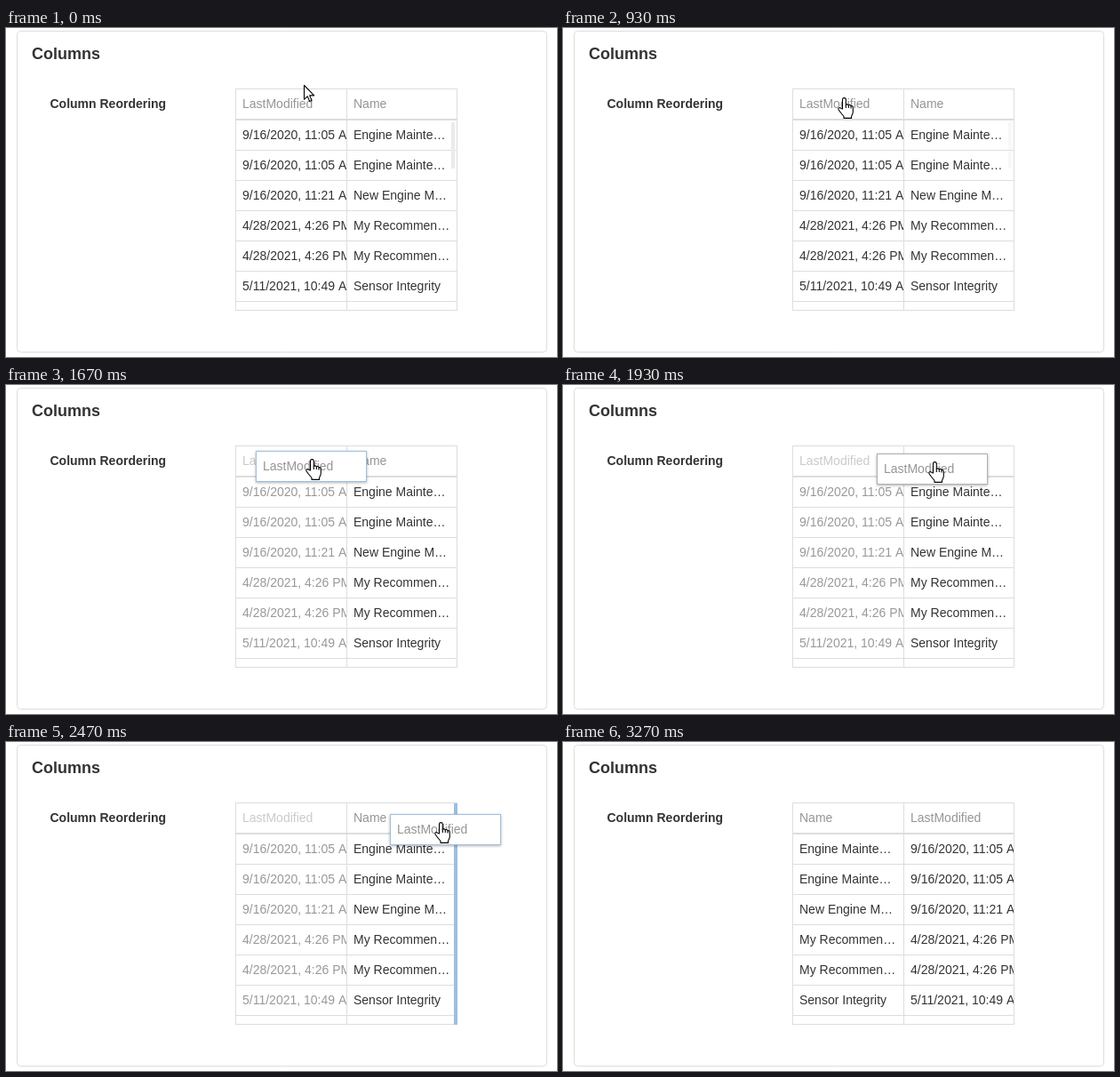
Animation of 620x370 px, one loop 4990 ms. Source, as an HTML page with a canvas:

```html
<!DOCTYPE html>
<html lang="en">
<head>
<meta charset="utf-8">
<title>Column Reordering</title>
<style>
html, body { margin: 0; width: 100%; height: 100%; overflow: hidden; background: #fff; }
canvas { display: block; }
</style>
</head>
<body>
<canvas id="stage" width="620" height="370"></canvas>
<script>
const ctx = document.getElementById("stage").getContext("2d");
const LOOP = 4990, LEFT = 258, MID = 383, RIGHT = 508, TOP = 68, BOTTOM = 318, ROW = 34;
const LINE = "#ddd", TEXT = "#333", MUTED = "#959595", BLUE = "#9cc0e0";
const DRAG = 22, DROP = 43, GONE = 49;

const modified = ["LastModified", "9/16/2020, 11:05 AM", "9/16/2020, 11:05 AM", "9/16/2020, 11:21 AM",
  "4/28/2021, 4:26 PM", "4/28/2021, 4:26 PM", "5/11/2021, 10:49 AM"];
const names = ["Name", "Engine Mainte…", "Engine Mainte…", "New Engine M…",
  "My Recommen…", "My Recommen…", "Sensor Integrity"];

// [tick, x, y]
const pointerKeys = [[3, 335, 64], [5, 328, 64], [6, 328, 64], [14, 316, 78], [19, 316, 78], [20, 316, 79],
  [21, 316, 79], [22, 324, 80], [25, 344, 83], [29, 418, 86], [33, 482, 90], [35, 488, 90],
  [37, 489, 90], [45, 489, 90], [46, 505, 90], [48, 589, 90]];
const chipKeys = [[22, 267, 73], [25, 281, 74], [29, 353, 77], [33, 416, 81], [35, 429, 81], [37, 432, 81]];

const arrow = new Path2D("M.5.5V16.3L4.2 12.8 6.6 18.4 9 17.4 6.6 11.9H11.7Z");
const hand = new Path2D("M5.5 13V2.5a1.9 1.9 0 0 1 3.8 0V8.5c.5-1 2.7-.9 3 .6 .6-1 2.4-.7 2.7.7 " +
  ".8-.7 2.3-.2 2.3 1.4V16.5c0 2-1.5 3.5-1.8 5V23.4H7V21.5C5.5 19.5 3 17 1 13.8c-.9-1.7 1.2-2.9 2.6-1.6z");
const knuckles = new Path2D("M9.3 8.5V12M12.3 9.2V12M15 10V12.5");

function along(keys, k) {
  const i = keys.findIndex(p => p[0] >= k);
  if (i < 0) return keys[keys.length - 1].slice(1);
  if (i === 0) return keys[0].slice(1);
  const a = keys[i - 1], b = keys[i], u = (k - a[0]) / (b[0] - a[0]);
  return [1, 2].map(j => Math.round(a[j] + (b[j] - a[j]) * u));
}

function rect(x, y, w, h, color) {
  ctx.fillStyle = color;
  ctx.fillRect(x, y, w, h);
}

function frame(x, y, w, h, color) {
  ctx.strokeStyle = color;
  ctx.lineWidth = 1;
  ctx.strokeRect(x + .5, y + .5, w - 1, h - 1);
}

function text(str, x, y, color, font = "14px") {
  ctx.font = font + " 'Liberation Sans', Arial, sans-serif";
  ctx.fillStyle = color;
  ctx.fillText(str, x, y);
}

function column(cells, x, alpha) {
  ctx.save();
  ctx.beginPath();
  ctx.rect(x, TOP, 125, BOTTOM - TOP);
  ctx.clip();
  ctx.globalAlpha = alpha;
  cells.forEach((c, i) => text(c, x + 8, i ? 91 + i * ROW : 90, i ? TEXT : MUTED));
  ctx.restore();
}

function chip(x, y, color) {
  ctx.save();
  ctx.shadowColor = "rgba(0,0,0,.3)";
  ctx.shadowBlur = 3;
  ctx.shadowOffsetY = 1;
  rect(x, y, 125, 35, "#fff");
  ctx.restore();
  frame(x, y, 125, 35, color);
  text(modified[0], x + 8, y + 22, MUTED);
}

function cursor(shape, x, y) {
  ctx.save();
  ctx.translate(x, y);
  ctx.fillStyle = "#fff";
  ctx.strokeStyle = "#000";
  ctx.lineWidth = 1.1;
  ctx.lineJoin = "round";
  ctx.fill(shape);
  ctx.stroke(shape);
  if (shape === hand) ctx.stroke(knuckles);
  ctx.restore();
}

function draw(k) {
  const dragging = k >= DRAG && k < DROP, swapped = k >= DROP;
  const [x, y] = along(pointerKeys, k);
  const overEnd = dragging && x > (MID + RIGHT) / 2;

  rect(0, 0, 620, 370, "#fff");
  ctx.strokeStyle = LINE;
  ctx.lineWidth = 1;
  ctx.beginPath();
  ctx.roundRect(12.5, 3.5, 596, 361, 4);
  ctx.stroke();
  text("Columns", 29, 35, TEXT, "bold 18px");
  text("Column Reordering", 49.5, 90, TEXT, "bold 14px");

  column(swapped ? names : modified, LEFT, dragging ? .5 : 1);
  column(swapped ? modified : names, MID, 1);
  frame(LEFT, TOP, RIGHT - LEFT, BOTTOM - TOP, LINE);
  rect(MID, TOP, 1, BOTTOM - TOP, LINE);
  rect(LEFT, 102, RIGHT - LEFT, 2, LINE);
  for (let i = 1; i < 7; i++) rect(LEFT, 103 + i * ROW, RIGHT - LEFT, 1, LINE);

  // fading scrollbar
  if (k < 20) {
    ctx.globalAlpha = Math.min(1, 1 - (Math.min(k, 14) - 3) / 18);
    rect(501, 106, 4, 52, "#ebebeb");
    ctx.globalAlpha = 1;
  }

  if (overEnd) rect(504, 69, 4, BOTTOM - 69, BLUE);
  if (dragging) chip(...along(chipKeys, k), overEnd || x < MID ? BLUE : "#b0b0b0");
  if (k < GONE) {
    const pointing = dragging || (y >= 69 && x < RIGHT);
    if (pointing) cursor(hand, x - 7, y);
    else cursor(arrow, x, y);
  }
}

// 15 ticks per second, each rounded to 10 ms
function tick(t) {
  const k = Math.floor((t + 4) * .015);
  return Math.round(k * 20 / 3) * 10 > t ? k - 1 : k;
}

function play() {
  draw(tick(performance.now() % LOOP));
  requestAnimationFrame(play);
}
play();
</script>
</body>
</html>
```
